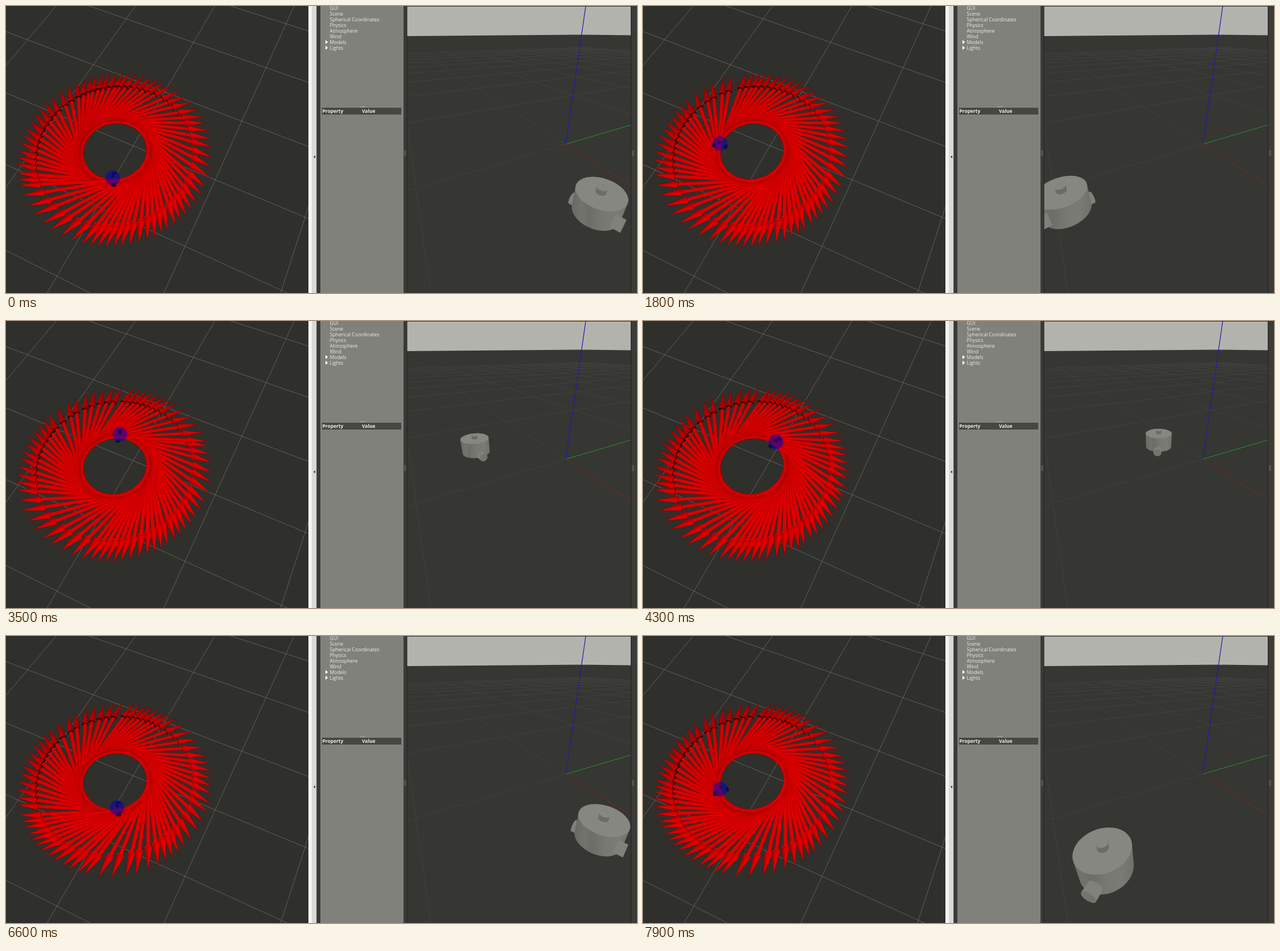
These frames come from a looping animation (1108x505 px, 8000 ms). An HTML page:

```html
<!DOCTYPE html>
<html lang="en">
<head>
<meta charset="utf-8">
<title>Robot driving in a circle</title>
<style>
html, body { margin: 0; width: 100%; height: 100%; overflow: hidden; background: #2f2f2b; }
svg { display: block; width: 1108px; height: 505px; }
text { font: 8.55px "Open Sans", "Noto Sans", sans-serif; fill: #ecece9; }
.bold { font-weight: bold; font-size: 8.45px; }
</style>
</head>
<body>
<svg viewBox="0 0 1108 505" xmlns="http://www.w3.org/2000/svg">
  <defs>
    <clipPath id="leftClip"><rect width="531" height="505"/></clipPath>
    <clipPath id="rightClip"><rect x="704" y="0" width="393" height="505"/></clipPath>
    <linearGradient id="side">
      <stop offset="0" stop-color="#696a65"/><stop offset=".18" stop-color="#72736d"/>
      <stop offset=".3" stop-color="#6c6d67"/><stop offset=".55" stop-color="#777872"/>
      <stop offset=".8" stop-color="#7a7b75"/><stop offset="1" stop-color="#70716b"/>
    </linearGradient>
  </defs>

  <g clip-path="url(#leftClip)">
    <rect width="531" height="505" fill="#2f2f2b"/>
    <path id="floor" fill="none" stroke="#9c9c9a" stroke-width=".8" opacity=".55"/>
    <g id="arrows" stroke-linejoin="round"></g>
    <g id="marker"></g>
  </g>

  <rect x="531" width="6" height="505" fill="#f4f4f2"/>
  <rect x="537" width="8.5" height="505" fill="#d9d9d6"/>
  <path d="M543 263v5l-3-2.500z" fill="#333"/>
  <rect x="545.5" width="6.500" height="505" fill="#3a3a37"/>
  <rect x="552" width="146" height="505" fill="#80817b"/>
  <rect x="698" width="6" height="505" fill="#3a3a37"/>
  <path d="M622 177.500h9" stroke="#c4c4c0" stroke-width="1" stroke-dasharray="1.500 1"/>
  <rect x="555" y="179" width="139" height="12" fill="#464642"/>
  <text class="bold" x="555.500" y="188">Property</text>
  <text class="bold" x="625" y="188">Value</text>
  <g id="tree"></g>
  <path d="M561 60l4.500 3.500-4.500 3.500zM561 70l4.500 3.500-4.500 3.500z" fill="#fff"/>

  <g clip-path="url(#rightClip)">
    <rect x="704" width="393" height="505" fill="#363632"/>
    <path id="ground" fill="none" stroke="#4b4c47" stroke-width=".8" opacity=".65"/>
    <path d="M704 1H1097V51.500L1005 50.500L704 53z" fill="#b2b3ad"/>
    <path d="M983 243L1097 317" stroke="#7a1e1e" stroke-width="1"/>
    <path d="M983 243L1097 209.500" stroke="#23912a" stroke-width="1"/>
    <path d="M983 243L1018 0" stroke="#1c1cb4" stroke-width="1.200"/>
    <g id="robot"></g>
  </g>
  <rect x="1097" width="11" height="505" fill="#3b3b38"/>
  <path d="M704 0V505M1097.500 0V505" stroke="#20201e"/>
  <path d="M700 254v10M702 254v10M1100 254v10M1102 254v10" stroke="#777772" stroke-width=".8"/>
</svg>
<script>
const $ = id => document.getElementById(id);
const RAD = Math.PI / 180, LOOP = 8000, STEP = 100;
const pt = p => p[0].toFixed(1) + ' ' + p[1].toFixed(1);
const poly = pts => 'M' + pts.map(pt).join('L') + 'Z';
const shape = (d, fill, more = '') => `<path d="${d}" fill="${fill}" ${more}/>`;
const range = (n, f) => Array.from({ length: n }, (_, i) => f(i));

// Linear interpolation through [time, angle] pairs.
function angleAt(keys, t) {
  const i = Math.max(1, keys.findIndex(k => k[0] >= t));
  const [t0, a0] = keys[i - 1], [t1, a1] = keys[i];
  return a0 + (a1 - a0) * (t - t0) / (t1 - t0);
}

$('tree').innerHTML = ['GUI', 'Scene', 'Spherical Coordinates', 'Physics', 'Atmosphere', 'Wind', 'Models', 'Lights']
  .map((s, i) => `<text x="568.5" y="${7 + i * 10}">${s}</text>`).join('');

/* ---- Left view: odometry arrows ---- */
// Each family of grid lines meets in one vanishing point.
$('floor').setAttribute('d',
  [-128, -51, 45, 153, 279, 430].map(y => `M0 ${y}L531 ${y + 531 * (0.366 + 0.000328 * y)}`).join('') +
  range(5, i => 88 + 139.3 * i).map((x, i) => `M${x} 0L${x + 505 * (0.13 * i - 0.843)} 505`).join(''));

// Floor (u right, v away, z up) to screen; the path radius is about 1.
function toMap(u, v, z = 0) {
  const s = 1 + 0.0376 * v;
  return [290 + (56.5 * u - 98.5) / s, -1080 + 1334 / s - 26 * z / s];
}

const PATH_R = 1.03, LEN = 2.84, NECK = LEN * 0.77, SHAFT = 0.054, HEAD = 0.112;

// Point in the frame of a pose at angle a: s forward, w to the right, z up.
function onPose(a, s, w, z) {
  const sn = Math.sin(a * RAD), cs = Math.cos(a * RAD);
  return toMap(-PATH_R * sn - cs * s + sn * w, -PATH_R * cs + sn * s + cs * w, z);
}

function arrowSvg(a) {
  const away = Math.sin(a * RAD), k = Math.max(0, away);
  const shaftFill = `rgb(${Math.round(221 - 10 * k)},0,0)`;
  const headFill = `rgb(${Math.round(222 - 48 * k)},0,0)`;
  const ring = range(14, i => {
    const b = i / 14 * 2 * Math.PI;
    return onPose(a, NECK, HEAD * Math.cos(b), HEAD * Math.sin(b));
  });
  const shaft = shape(poly([onPose(a, 0, -SHAFT, 0), onPose(a, NECK, -SHAFT, 0),
    onPose(a, NECK, SHAFT, 0), onPose(a, 0, SHAFT, 0)]), shaftFill, 'stroke="#960000" stroke-width=".7"');
  const cone = shape(poly([onPose(a, NECK, -HEAD, 0), onPose(a, LEN, 0, 0), onPose(a, NECK, HEAD, 0)]),
    headFill, 'stroke="#8a0000" stroke-width=".6"');
  const shade = shape(poly([onPose(a, NECK, HEAD * 0.3, 0), onPose(a, LEN, 0, 0), onPose(a, NECK, HEAD, 0)]),
    '#700000', 'opacity=".35"');
  const disc = shape(poly(ring), away > -0.1 ? '#300000' : headFill);
  return away > -0.1 ? cone + shade + disc + shaft : shaft + disc + cone + shade;
}

// Spacing of the poses in degrees, from each start angle on.
const SPACING = [
  [-360, 5], [-300, 6.5], [-281, 4.2], [-245, 4.6], [-215, 6], [-130, 4.4], [-60, 6.5],
  [0, 5], [59, 6.6], [115, 4.5], [145, 6], [240, 4.3], [262, 6.6], [300, 4.7]
];
let seed = 7;
const rand = () => (seed = seed * 16807 % 2147483647) / 2147483647;
const poses = [];
for (let a = -359; a < 440;) {
  const step = SPACING.filter(s => s[0] <= a).pop()[1];
  poses.push(a);
  a += step * (0.82 + 0.36 * rand());
}
$('arrows').innerHTML = poses.map(a => `<g>${arrowSvg(a)}</g>`).join('');
const arrowEls = [...$('arrows').children];

const MAP_TRACK = [[0, 0], [1100, 61], [2700, 146], [4300, 224], [5700, 301], [6600, 353], [7900, 427]];

function drawMap(t) {
  const a = angleAt(MAP_TRACK, t);
  arrowEls.forEach((el, i) => {
    el.style.display = poses[i] <= a && poses[i] > a - 360 ? '' : 'none';
  });
  const wheel = w => shape(poly([[-0.1, -0.03], [0.02, -0.03], [0.02, 0.04], [-0.1, 0.04]]
    .map(([s, d]) => onPose(a, s, w + d * Math.sign(w), 0.1))), '#0d0d12',
    'stroke="#0d0d12" stroke-width="1.500" stroke-linejoin="round" opacity=".8"');
  const [x, y] = onPose(a, 0, 0, 0.2);
  const [dx, dy] = onPose(a, 0, 0, 0.3);
  $('marker').innerHTML = wheel(-0.18) + wheel(0.2) +
    `<circle cx="${x}" cy="${y}" r="12.800" fill="#0a00be" opacity=".55"/>` +
    `<ellipse cx="${dx}" cy="${dy}" rx="3" ry="2.600" fill="#08082c" opacity=".7"/>`;
}

/* ---- Right view: simulated robot ---- */
const SP = 0.518, CP = 0.855, F = 340;

// l: to the right, d: ahead, h: below the camera.
function toSim(l, d, h) {
  const depth = d * CP + h * SP;
  return [900 + F * l / depth, 258 + F * (h * CP - d * SP) / depth];
}

function gridLine(p, q) {
  const depth = r => r[1] * CP + SP;
  const near = 0.15, a = depth(p), b = depth(q);
  if (a < near && b < near) return '';
  const cut = (r, s) => {
    const k = (near - depth(r)) / (depth(s) - depth(r));
    return [r[0] + (s[0] - r[0]) * k, r[1] + (s[1] - r[1]) * k];
  };
  const p2 = a < near ? cut(p, q) : p, q2 = b < near ? cut(q, p) : q;
  return 'M' + pt(toSim(p2[0], p2[1], 1)) + 'L' + pt(toSim(q2[0], q2[1], 1));
}

const CELL = 1.471;
const cell = (x, y) => [0.508 + CELL * (0.48 * x + 0.877 * y), 1.828 + CELL * (-0.877 * x + 0.48 * y)];
$('ground').setAttribute('d', range(21, i => i - 10).map(i =>
  gridLine(cell(i, -10), cell(i, 10)) + gridLine(cell(-10, i), cell(10, i))).join(''));

function hull(pts) {
  const s = [...pts].sort((p, q) => p[0] - q[0] || p[1] - q[1]);
  const half = list => {
    const out = [];
    for (const p of list) {
      for (;;) {
        const n = out.length;
        if (n < 2) break;
        const [a, b] = [out[n - 2], out[n - 1]];
        if ((b[0] - a[0]) * (p[1] - a[1]) - (b[1] - a[1]) * (p[0] - a[0]) > 0) break;
        out.pop();
      }
      out.push(p);
    }
    return out.slice(0, -1);
  };
  return [...half(s), ...half(s.reverse())];
}

const circle = f => range(40, i => f(Math.cos(i * 9 * RAD), Math.sin(i * 9 * RAD)));

const SIM_TRACK = [[0, -47.3], [1100, 9.3], [2700, 99], [4300, 185.5], [5700, 261.9], [6600, 309.5], [7900, 379.4]];

function drawSim(t) {
  const a = angleAt(SIM_TRACK, t) * RAD, sn = Math.sin(a), cs = Math.cos(a);
  const l = -0.04 - 0.888 * sn, d = 1.69 - 0.9 * cs;
  const disc = (r, h) => circle((c, s) => toSim(l + r * c, d + r * s, h));
  const drum = (r, top, bottom, fill) => {
    const face = disc(r, top);
    return shape(poly(hull([...face, ...disc(r, bottom)])), fill) + shape(poly(face), '#868781');
  };
  // Axle points along (sn, cs); forward is (-cs, sn).
  const wheel = side => {
    const rim = w => circle((c, s) => toSim(
      l + side * w * sn - 0.053 * c * cs, d + side * w * cs + 0.053 * c * sn, 1.2 + 0.053 * s));
    const outer = rim(0.212);
    const toCam = side * (sn * (l + side * 0.212 * sn) + cs * (d + side * 0.212 * cs)) < 0;
    return shape(poly(hull([...rim(0.14), ...outer])), '#80817b') +
      (toCam ? shape(poly(outer), '#73746e') : '');
  };
  const nearSide = sn * l + cs * d > 0 ? -1 : 1;
  $('robot').innerHTML = wheel(-nearSide) + drum(0.184, 1, 1.2, 'url(#side)') +
    wheel(nearSide) + drum(0.037, 0.955, 1, '#6b6c66');
}

let last = -1;
function frame(now) {
  const t = Math.floor(now % LOOP / STEP) * STEP;
  if (t !== last) {
    last = t;
    drawMap(t);
    drawSim(t);
  }
  requestAnimationFrame(frame);
}
drawMap(0);
drawSim(0);
requestAnimationFrame(frame);
</script>
</body>
</html>
```
